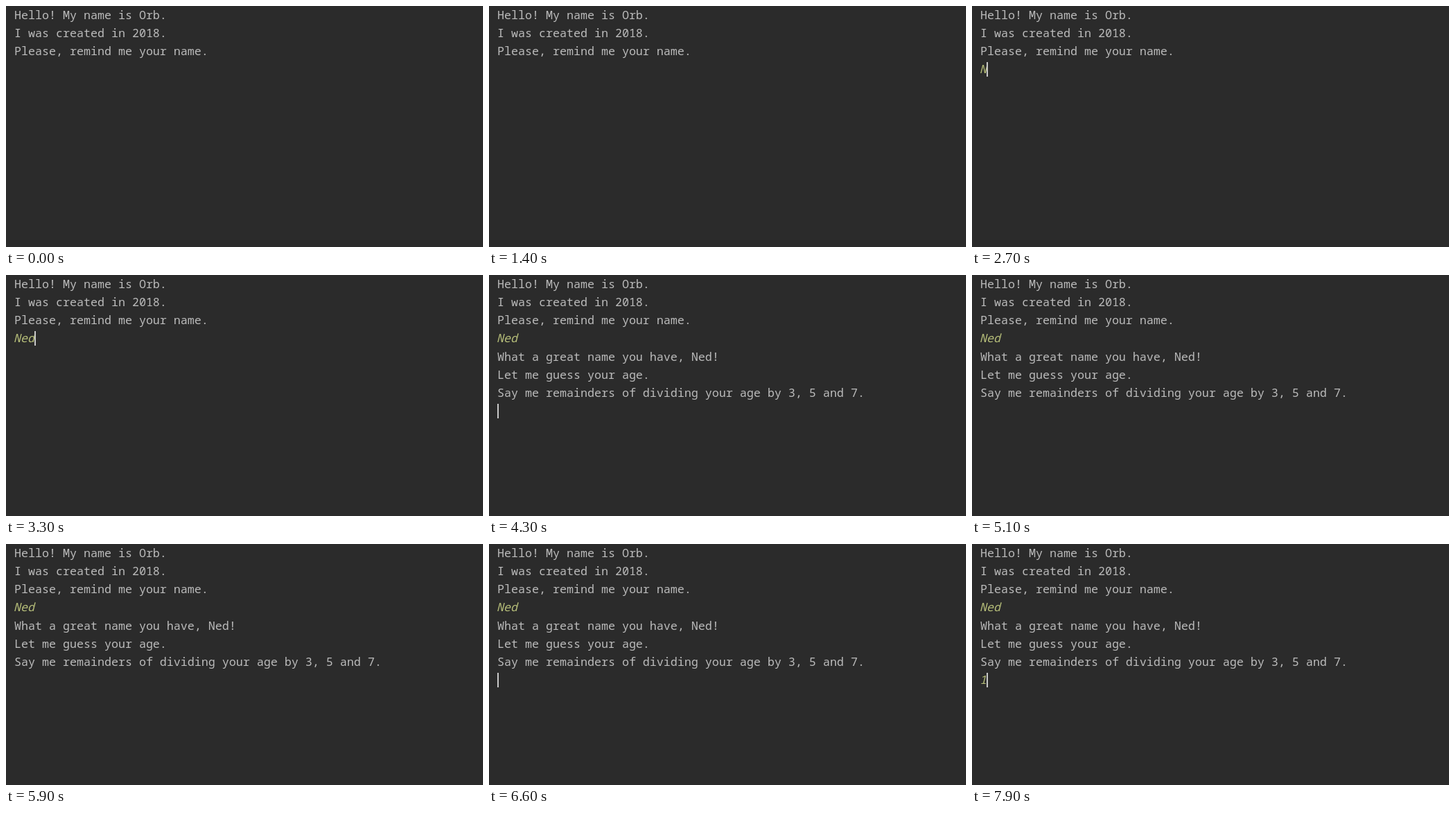
An HTML page for the animation above (8000 ms loop, 688 px wide and 348 px high).

```html
<!DOCTYPE html>
<html lang="en">
<head>
<meta charset="utf-8">
<title>Console chat</title>
<style>
  html, body { margin: 0; width: 100%; height: 100%; overflow: hidden; background: #2b2b2b; }
  svg { display: block; width: 100vw; height: 100vh; }
  text { font: 16.667px "Noto Sans Mono", monospace; fill: #bbb; white-space: pre; }
  .input { font-style: italic; fill: #b5bd79; }
  .caret { fill: #c8c8c8; }
  .key1, .key2, .key3, .reply, .answer, .caret { animation: 8s step-end infinite; }

  .key1 { animation-name: key1; }
  .key2 { animation-name: key2; }
  .key3 { animation-name: key3; }
  .reply { animation-name: reply; }
  .answer { animation-name: answer; }
  .caret { animation-name: caret; }

  @keyframes key1 { 0% { visibility: hidden } 33.75%, 100% { visibility: visible } }
  @keyframes key2 { 0% { visibility: hidden } 37.5%, 100% { visibility: visible } }
  @keyframes key3 { 0% { visibility: hidden } 40%, 100% { visibility: visible } }
  @keyframes reply { 0% { visibility: hidden } 53.75%, 100% { visibility: visible } }
  @keyframes answer { 0% { visibility: hidden } 97.5%, 100% { visibility: visible } }

  /* blinks while idle, moves with each key and line */
  @keyframes caret {
    0% { visibility: hidden; transform: none }
    10%, 22.5% { visibility: visible }
    17.5%, 30% { visibility: hidden }
    33.75% { visibility: visible; transform: translate(9px, 0) }
    37.5% { visibility: visible; transform: translate(19px, 0) }
    40% { visibility: visible; transform: translate(29px, 0) }
    47.5% { visibility: hidden }
    51.25% { visibility: visible; transform: translate(0, 26px) }
    53.75% { visibility: visible; transform: translate(0, 105px) }
    60%, 72.5%, 85% { visibility: hidden }
    66.25%, 78.75%, 91.25% { visibility: visible }
    97.5%, 100% { visibility: visible; transform: translate(9px, 105px) }
  }
</style>
</head>
<body>
<svg viewBox="0 0 688 348">
  <text x="12" y="19">Hello! My name is Orb.</text>
  <text x="12" y="45">I was created in 2018.</text>
  <text x="12" y="71">Please, remind me your name.</text>
  <g>
    <text class="input key1" x="11" y="97">N</text>
    <text class="input key2" x="21" y="97">e</text>
    <text class="input key3" x="31" y="97">d</text>
  </g>
  <g class="reply">
    <text x="12" y="124">What a great name you have, Ned!</text>
    <text x="12" y="150">Let me guess your age.</text>
    <text x="12" y="176">Say me remainders of dividing your age by 3, 5 and 7.</text>
  </g>
  <text class="input answer" x="11" y="202">1</text>
  <rect class="caret" x="12" y="81" width="2" height="21"/>
</svg>
</body>
</html>
```
